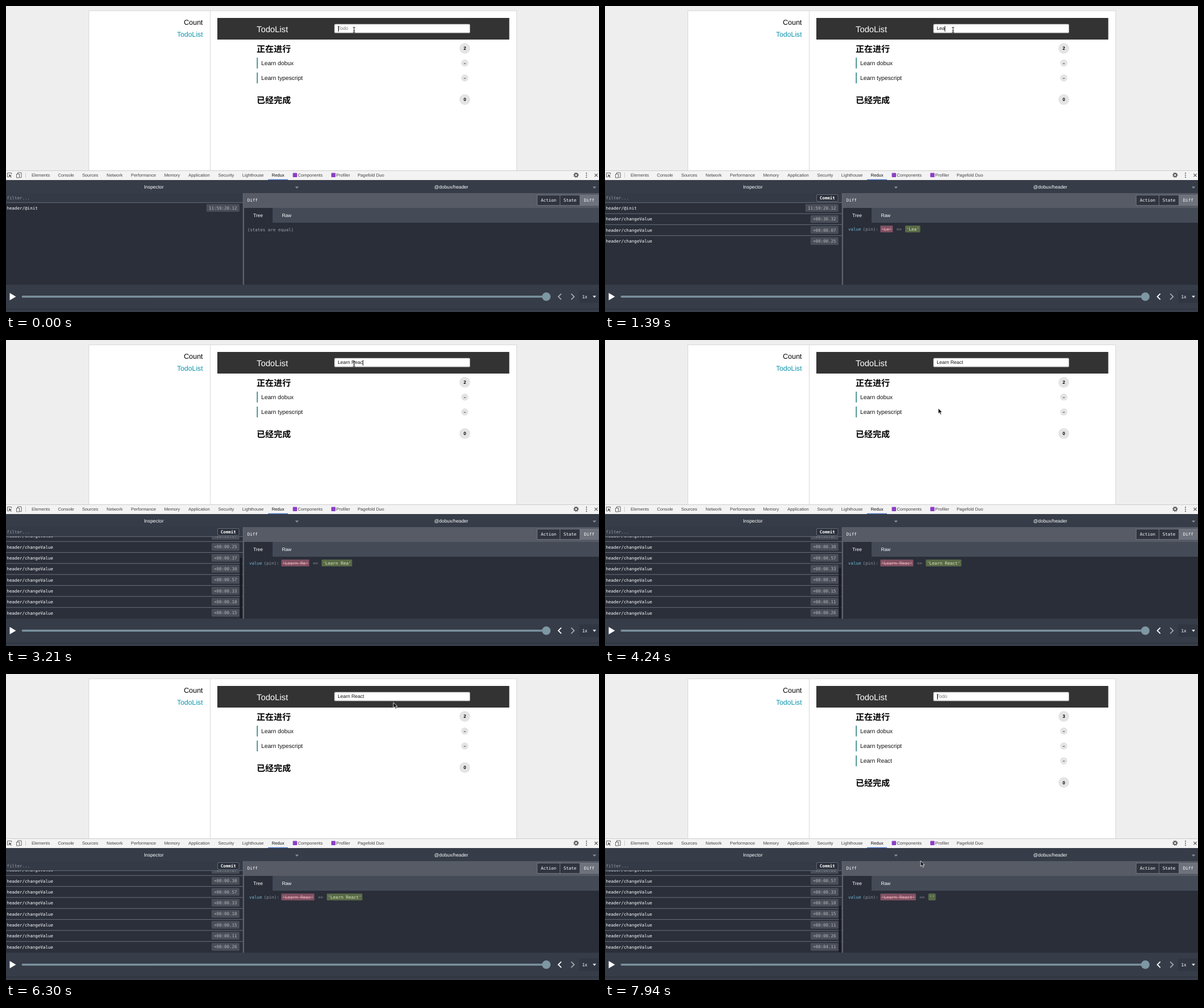
Write an HTML page that moves like this. It is 1041 px wide and 538 px high and loops after 8000 ms.

```html
<!DOCTYPE html>
<html lang="zh">
<head>
<meta charset="utf-8">
<title>TodoList</title>
<style>
html, body { margin: 0; height: 100%; overflow: hidden; background: #eee; }
svg { display: block; width: 100vw; height: 100vh; }
text { font-family: "Liberation Sans", Arial, sans-serif; white-space: pre; text-rendering: geometricPrecision; }
.mono { font-family: "DejaVu Sans Mono", monospace; font-size: 7.5px; }
.cjk { font: bold 15px "Noto Sans CJK SC", "Noto Sans CJK", sans-serif; }
.mid { text-anchor: middle; }
.end { text-anchor: end; }
.bold { font-weight: bold; }
.tab { font-size: 7.7px; fill: #444; text-anchor: middle; }
.item { font-size: 10.25px; fill: #111; }
.input { font-size: 8.55px; }
.panel { font-size: 8.4px; fill: #fff; }
</style>
</head>
<body>
<svg id="stage" viewBox="0 0 1041 538" preserveAspectRatio="none">
  <defs>
    <clipPath id="listClip"><rect y="346" width="416" height="143.6"/></clipPath>
  </defs>

  <g id="page">
    <rect width="1041" height="290" fill="#eee"/>
    <rect x="145.5" y="8.5" width="751" height="290" fill="#fff" stroke="#d9d9d9"/>
    <path d="M358.5 9V290" stroke="#d9d9d9"/>
    <text class="end" x="345.6" y="33.2" font-size="12.5">Count</text>
    <text class="end" x="345.6" y="53.7" font-size="12.2" fill="#0c93ab">TodoList</text>
    <rect x="371" y="21" width="512.5" height="38" fill="#333"/>
    <text x="440" y="45.8" font-size="14.8" fill="#fff">TodoList</text>
    <rect x="576" y="31.5" width="239" height="16.5" rx="2.5" fill="#8b8b8b"/>
    <rect x="577" y="32.3" width="237" height="14.4" rx="1.5" fill="#fff"/>
    <text id="typed" class="input" x="582.2" y="42.3"></text>
    <rect id="caret" y="35" width="1" height="10" fill="#111"/>
    <text class="cjk" x="440" y="80.5">正在进行</text>
    <g id="todos"></g>
    <g id="done"><text class="cjk" x="440" y="170.5">已经完成</text></g>
  </g>

  <g id="tools">
    <rect y="289" width="1041" height="18" fill="#f3f3f3"/>
    <path d="M0 289.5H1041" stroke="#cdcdcd"/>
    <path d="M34.5 293V302" stroke="#ccc"/>
    <g fill="none" stroke="#555" stroke-width=".9">
      <path d="M5 300.5H2.5V293.5H9.500V296"/>
      <path d="M5 296L10 298.300 8 299 9.800 301.500 8.900 302 7.200 299.800 5.800 301Z" fill="#555" stroke="none"/>
      <path d="M20.500 295V293H27V301.500H24.500M18.500 295.500H23.500V302H18.500Z"/>
      <circle cx="1000.800" cy="297.300" r="2.600" stroke-width="1.700"/>
      <circle cx="1000.800" cy="297.300" r="4" stroke-width="1.300" stroke-dasharray="1.570"/>
      <path d="M1033.300 294.800L1038.700 300.200M1038.700 294.800L1033.300 300.200" stroke-width="1.200"/>
    </g>
    <g fill="#555"><circle cx="1019" cy="294" r="1"/><circle cx="1019" cy="297.500" r="1"/><circle cx="1019" cy="301" r="1"/></g>
    <rect x="503.500" y="293.500" width="7.500" height="7.500" rx="1" fill="#8c3fc4"/>
    <rect x="571" y="293.500" width="7.500" height="7.500" rx="1" fill="#8c3fc4"/>
    <rect x="460" y="304.700" width="35" height="1.500" fill="#4b78c8"/>

    <rect y="306" width="1041" height="232" fill="#363c48"/>
    <text class="panel mid" x="259.500" y="321.300">Inspector</text>
    <text class="panel mid" x="781.700" y="321.300">@dobux/header</text>
    <path d="M507.500 317.500H514L510.700 321ZM1029.800 317.500H1036.300L1033 321Z" fill="#8b919b"/>
    <rect y="329" width="416" height="161" fill="#2a2f3a"/>
    <rect y="329" width="416" height="16.500" fill="#343a46"/>
    <text class="mono" x="1.500" y="340" fill="#9a9fa8">filter...</text>
    <path d="M0 345.700H416" stroke="#6b717c"/>
    <g id="commit">
      <rect x="371.500" y="331.500" width="37.500" height="12" rx="1.500" fill="#2a2f3a" stroke="#737986" stroke-width=".8"/>
      <text class="mono mid bold" x="390.300" y="340.200" fill="#fff">Commit</text>
    </g>
    <g clip-path="url(#listClip)">
      <g id="rows"></g>
      <rect id="bar" x="410.500" width="4" rx="2" fill="#181b22"/>
    </g>

    <rect x="418" y="329" width="623" height="26" fill="#565b66"/>
    <rect x="418" y="355" width="623" height="26" fill="#444a56"/>
    <rect x="418" y="355" width="50" height="27" fill="#2a2e39"/>
    <rect x="418" y="381" width="623" height="109" fill="#2a2e39"/>
    <rect x="415.700" y="329" width="2.300" height="161" fill="#5d626d"/>
    <text class="mono" x="423.700" y="344.300" fill="#fff">Diff</text>
    <text class="panel mid" x="442.500" y="370.800">Tree</text>
    <text class="panel mid" x="492.800" y="370.800">Raw</text>
    <g id="views"></g>
    <text id="equal" class="mono" x="423.700" y="395.700" fill="#9da1a8">(states are equal)</text>
    <g id="diff">
      <text class="mono" x="427" y="395.200" fill="#6fb7d4">value</text>
      <text class="mono" x="452.500" y="395.200" fill="#8f959f">(pin):</text>
      <rect id="oldBox" x="483.300" y="386" height="12" rx="1.500" fill="#7f5061"/>
      <text id="oldText" class="mono" x="485.300" y="395.200" fill="#f0b0bd" text-decoration="line-through"></text>
      <text id="arrow" class="mono" y="395.200" fill="#8f959f">=&gt;</text>
      <rect id="newBox" y="386" height="12" rx="1.500" fill="#586a47"/>
      <text id="newText" class="mono" y="395.200" fill="#dbe8bd"></text>
    </g>

    <path d="M0 533H1041" stroke="#2a2f39"/>
    <path d="M6.500 504.500L17.500 511L6.500 517.500Z" fill="#fff"/>
    <rect x="27.500" y="509.200" width="920" height="3.600" rx="1.800" fill="#7a929e"/>
    <circle cx="948.500" cy="511" r="7.500" fill="#7d97a3"/>
    <g fill="none" stroke="#a2a7af" stroke-width="1.800">
      <path id="back" d="M974.800 505.800L969.600 511L974.800 516.200"/>
      <path d="M992.200 505.800L997.400 511L992.200 516.200"/>
    </g>
    <rect x="1006" y="500" width="35" height="22" fill="#303642"/>
    <text class="panel" x="1011.500" y="514" font-size="8">1x</text>
    <path d="M1030 509.500H1036L1033 513Z" fill="#fff"/>
  </g>

  <g id="pointer" stroke-linejoin="round">
    <path id="beam" d="M-2 -4.800Q0 -4.800 0 -3.500Q0 -4.800 2 -4.800M0 -3.800V4M-2 5Q0 5 0 3.700Q0 5 2 5M-1.200 1.500H1.200" fill="none" stroke="#222" stroke-width="1"/>
    <path id="tip" d="M0 0V9.700L2.300 7.600L4 11.300L5.700 10.500L4.100 7H7.100Z" fill="#111" stroke="#fff" stroke-width=".8"/>
    <path id="hand" d="M2 1Q3 -.5 4 1V4.500L8.500 5.500Q9.800 6 9.500 7.500L8.500 12H3.500L.3 7.800Q.3 6.300 2 7.200Z" fill="#fff" stroke="#111" stroke-width=".8"/>
  </g>
</svg>
<script>
const LOOP = 8000, PITCH = 19.34, LIST_TOP = 345.7, LIST_H = 143.9, CHAR = 4.515;
const PHRASE = 'Learn React';
const $ = id => document.getElementById(id);

function add(parent, tag, attrs, text = '') {
  const el = document.createElementNS('http://www.w3.org/2000/svg', tag);
  for (const key in attrs) el.setAttribute(key, attrs[key]);
  el.textContent = text;
  parent.append(el);
  return el;
}
const set = (el, attrs) => { for (const key in attrs) el.setAttribute(key, attrs[key]); };
const show = (el, on) => { el.style.display = on ? '' : 'none'; };
const at = (table, t) => table.findLast(step => step[0] <= t);

// time, typed letters, logged actions
const typing = [
  [0, 0, 0], [920, 1, 1], [1080, 2, 2], [1230, 3, 2], [1390, 3, 3], [1690, 4, 4],
  [1990, 5, 5], [2590, 6, 6], [2880, 7, 7], [3060, 9, 8], [3210, 10, 9],
  [3360, 10, 10], [3510, 11, 11], [7650, 0, 12]
];
const blinks = [0, 450, 920, 3950, 4520, 4970, 5570, 6000, 6600, 6900, 7500];
const moves = [
  [0, 611, 42, 'beam'], [4100, 585, 120, 'tip'], [4250, 440, 300, 'tip'], [4400, 290, 425, 'hand'],
  [4520, 236, 438, 'hand'], [4670, 222, 437, 'hand'], [4820, 224, 436, 'hand'], [4970, 228, 435, 'hand'],
  [5120, 510.5, 253, 'tip'], [5270, 640, 200, 'tip'], [5420, 738, 150, 'tip'], [5570, 756, 124, 'tip'],
  [5720, 750, 113, 'tip'], [5870, 730, 109, 'tip'], [6000, 706, 107, 'tip'], [6150, 685, 105, 'tip'],
  [6300, 680, 50, 'tip'], [7650, 650, 118, 'tip'], [7800, 590, 252, 'tip'], [7940, 554, 328.5, 'tip']
];
// hovered row turns its time over to two buttons
const FLIP_ROW = 9;
const flips = [[0, 0], [4400, .35], [4520, 1], [5120, .35], [5270, 0]];

const tabs = [
  ['Elements', 61], ['Console', 105.3], ['Sources', 147.8], ['Network', 190.7], ['Performance', 241.3],
  ['Memory', 291.6], ['Application', 339], ['Security', 386.5], ['Lighthouse', 433.5], ['Redux', 477.5],
  ['Components', 534], ['Profiler', 592], ['Pagefold Duo', 640.5]
];
for (const [name, x] of tabs) {
  const tab = add($('tools'), 'text', { class: 'tab', x, y: 300 }, name);
  if (name === 'Redux') tab.style.fill = '#111';
}

for (const [name, x, w] of [['Action', 932.5, 40], ['State', 972.5, 35], ['Diff', 1007.5, 32.5]]) {
  add($('views'), 'rect', {
    x, y: 332.5, width: w, height: 18, fill: name === 'Diff' ? '#6d727c' : '#2f343f', stroke: '#777c87', 'stroke-width': .8
  });
  add($('views'), 'text', { class: 'mono mid', x: x + w / 2, y: 344.3, fill: '#fff' }, name);
}

function badge(parent, y, r, label, size) {
  add(parent, 'circle', { cx: 805.4, cy: y, r, fill: '#e4e4e4' });
  return add(parent, 'text', { class: 'mid bold', x: 805.4, y: y + size * .36, 'font-size': size }, label);
}
const count = badge($('page'), 74.5, 9.4, '2', 8);
badge($('done'), 164.5, 9.4, '0', 8);
const todos = ['Learn dobux', 'Learn typescript', PHRASE].map((name, i) => {
  const g = add($('todos'), 'g', {}), y = 100.3 + i * 26.2;
  add(g, 'rect', { x: 440.2, y: y - 9.5, width: 1.8, height: 19, fill: '#3f8f8c' });
  add(g, 'text', { class: 'item', x: 448, y: y + 3.7 }, name);
  badge(g, y, 6.3, '–', 7);
  return g;
});

const chip = (g, x, w, label, fill, color) => {
  add(g, 'rect', { x, y: -7, width: w, height: 13.5, rx: 1.5, fill });
  add(g, 'text', { class: 'mono mid', x: x + w / 2, y: 2.5, fill: color }, label);
};
const delays = ['36.32', '00.07', '00.25', '00.37', '00.30', '00.57', '00.33', '00.10', '00.15', '00.11', '00.26', '04.11'];
const rows = ['11:59:20.12', ...delays.map(d => '+00:' + d)].map((time, i) => {
  const y = LIST_TOP + (i + .5) * PITCH;
  const row = add($('rows'), 'g', { transform: `translate(0 ${y})` });
  if (i) add(row, 'path', { d: `M0 ${-PITCH / 2}H416`, stroke: '#737984', 'stroke-width': .9 });
  add(row, 'text', { class: 'mono', x: 1.5, y: 2.7, fill: '#fff' }, i ? 'header/changeValue' : 'header/@init');
  const stamp = add(row, 'g', {}), w = time.length * CHAR + 8.3;
  chip(stamp, 409.8 - w, w, time, '#4a4e58', '#b4b7bc');
  const buttons = add(row, 'g', {});
  chip(buttons, 352, 28.5, 'Jump', '#444a56', '#fff');
  chip(buttons, 381.3, 28.5, 'Skip', '#444a56', '#fff');
  return { row, stamp, buttons };
});

function drawDiff(n) {
  show($('equal'), !n);
  show($('diff'), n);
  if (!n) return;
  const before = `'${PHRASE.slice(0, n - 1)}'`;
  const after = n > PHRASE.length ? "''" : `'${PHRASE.slice(0, n)}'`;
  const width = s => s.length * CHAR + 3.9;
  const arrowX = 483.3 + width(before) + 6.4, newX = arrowX + 15.3;
  set($('oldBox'), { width: width(before) });
  set($('arrow'), { x: arrowX });
  set($('newBox'), { x: newX, width: width(after) });
  set($('newText'), { x: newX + 2 });
  $('oldText').textContent = before;
  $('newText').textContent = after;
}

function drawList(n, t) {
  const height = (n + 1) * PITCH, scroll = Math.max(0, height - LIST_H);
  const thumb = LIST_H * LIST_H / height, flip = at(flips, t)[1];
  set($('rows'), { transform: `translate(0 ${-scroll})` });
  rows.forEach(({ row, stamp, buttons }, i) => {
    const f = i === FLIP_ROW ? flip : 0;
    show(row, i <= n);
    show(stamp, f < .5);
    show(buttons, f > .5);
    set(stamp, { transform: `scale(1 ${Math.max(0, 1 - 2 * f)})` });
  });
  set($('bar'), { y: LIST_TOP + LIST_H - thumb, height: thumb });
  show($('bar'), scroll && (t < 4400 || t >= 7650));
  show($('commit'), n);
  set($('back'), { stroke: n ? '#fff' : '#a2a7af' });
}

function drawPage(letters, n, t) {
  const typed = $('typed'), added = n > PHRASE.length;
  typed.textContent = letters ? PHRASE.slice(0, letters) : 'Todo';
  set(typed, { fill: letters ? '#111' : '#777' });
  set($('caret'), { x: letters ? 582 + typed.getComputedTextLength() : 583 });
  show($('caret'), blinks.filter(b => b <= t).length % 2);
  show(todos[2], added);
  count.textContent = added ? 3 : 2;
  set($('done'), { transform: `translate(0 ${added ? 26.2 : 0})` });
}

function draw(t) {
  const [, letters, n] = at(typing, t);
  drawPage(letters, n, t);
  drawList(n, t);
  drawDiff(n);
  const [, x, y, shape] = at(moves, t);
  set($('pointer'), { transform: `translate(${x} ${y})` });
  for (const id of ['beam', 'tip', 'hand']) show($(id), id === shape);
}

const start = performance.now();
function tick() {
  draw((performance.now() - start) % LOOP);
  requestAnimationFrame(tick);
}
tick();
</script>
</body>
</html>
```
